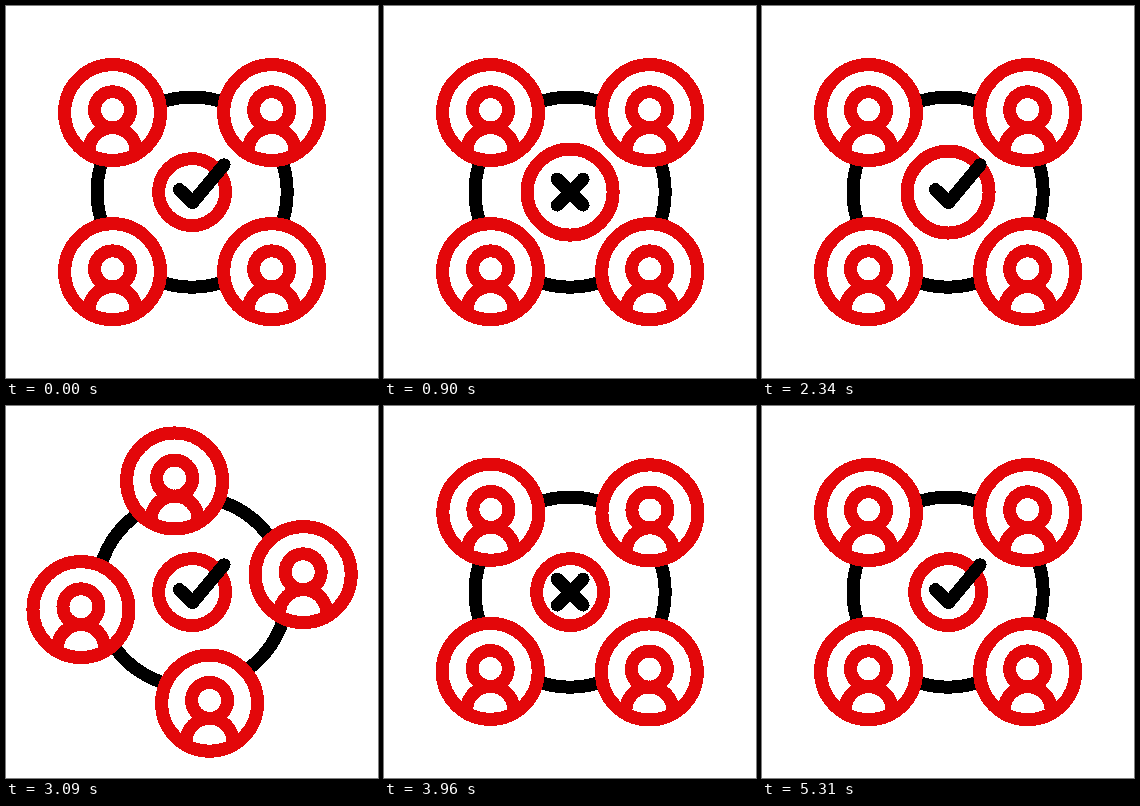
Write an HTML page that moves like this. It is 372 px wide and 372 px high and loops after 5.4 s.

```html
<!DOCTYPE html>
<html lang="en">
<head>
<meta charset="utf-8">
<title>Group decision</title>
<style>
  html, body { margin: 0; width: 100%; height: 100%; overflow: hidden; background: #fff; }
  svg { display: block; width: 100%; height: 100%; }
  .line {
    fill: none; stroke-width: 13; stroke-linecap: round; stroke-linejoin: round;
    shape-rendering: crispEdges;
  }
  .red { stroke: #e3070a; }
  .black { stroke: #000; }
  .solid { fill: #fff; }
</style>
</head>
<body>
<svg viewBox="0 0 372 372">
  <defs>
    <clipPath id="disc"><circle r="48"/></clipPath>
    <g id="person" class="line red">
      <circle class="solid" r="48"/>
      <path d="M-23.5 60V38.5a23.5 23.5 0 0 1 47 0V60" clip-path="url(#disc)"/>
      <circle cy="-2.8" r="18"/>
      <circle r="48"/>
    </g>
  </defs>
  <g transform="translate(186.1 186.1)">
    <circle class="line black" r="95.1"/>
    <g id="people"></g>
    <circle id="ring" class="line red" r="33.5"/>
    <path id="check" class="line black" d="M-12.7-2.5L.5 10.5L32-27.3"/>
    <path id="cross" class="line black" d="M-13-13L13 13M13-13L-13 13"/>
  </g>
</svg>
<script>
  const LOOP = 5400, STEP = 30;
  const ORBIT = 112.5, RING = 33.5, SWELL = 9.5, PULSE = 300;
  // Each quarter turn ends at the peak of the ring's pulse.
  const TURNS = [[0, 900], [1350, 2250], [2700, 3600], [3930, 5010]];

  const byId = id => document.getElementById(id);
  const ring = byId('ring'), check = byId('check'), cross = byId('cross');
  const people = [0, 1, 2, 3].map(() => {
    const use = document.createElementNS('http://www.w3.org/2000/svg', 'use');
    use.setAttribute('href', '#person');
    return byId('people').appendChild(use);
  });

  const ease = p => {
    p = Math.min(1, Math.max(0, p));
    return p * p * (3 - 2 * p);
  };

  function showMark(el, scale) {
    el.setAttribute('display', scale > 0.01 ? 'inline' : 'none');
    el.setAttribute('transform', `scale(${scale})`);
  }

  function draw(t) {
    let turn = 0, swell = 0, size = 1, swaps = 0;
    for (const [start, end] of TURNS) {
      const swap = end - PULSE / 2;
      turn += ease((t - start) / (end - start));
      swell += ease(1 - Math.abs(t - end) / PULSE);
      size = Math.min(size, ease(Math.abs(t - swap) / (PULSE / 2)));
      if (t >= swap) swaps++;
    }
    people.forEach((el, i) => {
      const a = (turn + i + 0.5) * Math.PI / 2;
      el.setAttribute('transform', `translate(${ORBIT * Math.cos(a)} ${ORBIT * Math.sin(a)})`);
    });
    ring.setAttribute('r', RING + SWELL * swell);
    const crossed = swaps % 2 === 1;
    showMark(check, crossed ? 0 : size);
    showMark(cross, crossed ? size : 0);
  }

  const origin = performance.now();
  function tick() {
    const t = (performance.now() - origin) % LOOP;
    draw(Math.floor(t / STEP) * STEP);
    requestAnimationFrame(tick);
  }
  draw(0);
  requestAnimationFrame(tick);
</script>
</body>
</html>
```
